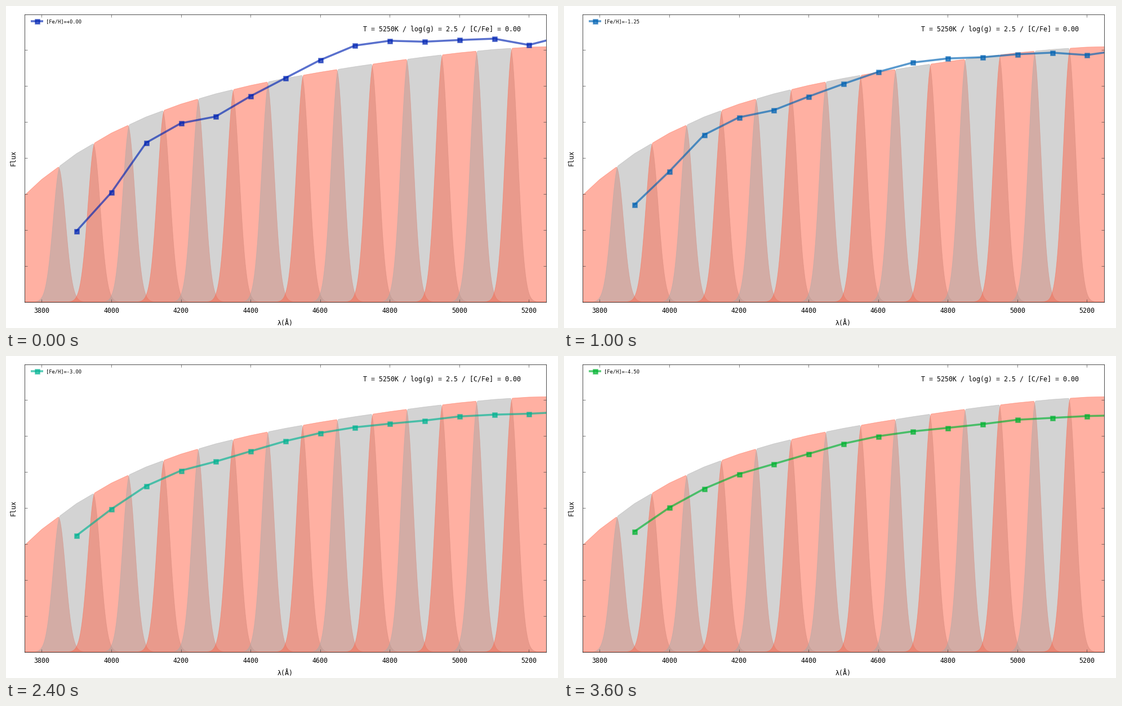
These frames come from a looping animation (980x572 px, 3800 ms). A matplotlib script:

```python
import numpy as np
import matplotlib.pyplot as plt
from matplotlib.animation import FuncAnimation
from matplotlib.colors import hsv_to_rgb

W, H, DPI = 980, 572, 64
PX = 72 / DPI                      # points per pixel
LEFT, RIGHT, TOP, BOTTOM = 32.5, 959.2, 14.5, 525.7
FRAMES, STEP = 19, 200
FONT = "DejaVu Sans Mono"


def bump(u, center, width):
    return np.exp(-0.5 * ((u - center) / width) ** 2)


def ramp(u, center, width):
    return 1 / (1 + np.exp((center - u) / width))


# Heights are in pixels; u is the wavelength in units of 100 A from 4500 A.
def continuum(u):
    return np.polyval([-0.00946, 0.10525, -0.8018, 11.63, 397.2], u)


def flux(u, s):
    """Stellar flux; s falls from 1 (metal rich) to 0 (metal poor)."""
    poor = (np.polyval([-0.00849, 0.125, -1.1736, 12.29, 368], u)
            + 4 * bump(u, 1.2, 1.1) - 4.5 * bump(u, -1.6, 0.7) + 2 * bump(u, 5, 0.5))
    redward = 52 * ramp(u, 0, 1) + 19 * bump(u, 2.4, 1.1)
    blocked = 90 * ramp(-u, 4.74, 0.32) + 10.7 * bump(u, -2, 0.4) + 14.5 * bump(u, 7, 0.3)
    rebound = 14 * bump(u, -3.3, 2) * 1.3 * s * (1 - s**6)
    return poor + s**2 * (redward - blocked) + rebound


def band(wave, center):
    """Flat-topped filter with Gaussian wings; the outer bands stay open."""
    d = wave - center
    if center == 3800:
        d = np.maximum(d, 0)
    if center == 5200:
        d = np.minimum(d, 0)
    return bump(np.maximum(np.abs(d) - 47, 0), 0, 20.5)


def to_u(wave):
    return (wave - 4500) / 100


fig = plt.figure(figsize=(W / DPI, H / DPI), dpi=DPI, facecolor="white")
ax = fig.add_axes([LEFT / W, 1 - BOTTOM / H, (RIGHT - LEFT) / W, (BOTTOM - TOP) / H])
ax.set(xlim=(3750, 5250), ylim=(0, BOTTOM - TOP))
ax.set_xticks(range(3800, 5201, 200))
ax.set_yticks(np.linspace(0, BOTTOM - TOP, 9)[1:-1])
ax.tick_params(direction="in", top=True, right=True, length=5 * PX, width=0.6 * PX,
               color="#333333", labelbottom=False, labelleft=False)
for spine in ax.spines.values():
    spine.set(linewidth=0.8 * PX, color="#222222")

# The continuum is sampled every 100 A, the filters finely
coarse = np.arange(3700, 5301, 100)
wave = np.linspace(3700, 5300, 1601)
top = np.interp(wave, coarse, continuum(to_u(coarse)))
for n, center in enumerate(range(3800, 5201, 100)):
    ax.fill_between(wave, top * band(wave, center), alpha=0.5, linewidth=0.8 * PX,
                    color="darkgray" if n % 2 else "tomato")

stage = fig.add_axes([0, 0, 1, 1])
stage.set(xlim=(0, W), ylim=(H, 0))
stage.axis("off")


def label(x, y, text, size=11.6, ha="center", **kw):
    return stage.text(x, y, text, family=FONT, fontsize=size * PX, ha=ha,
                      va="baseline", color="black", **kw)


for tick in range(3800, 5201, 200):
    label(LEFT + (tick - 3750) / 1500 * (RIGHT - LEFT), 545, str(tick))
label(496, 566.5, "λ(Å)")
label(16.5, 270, "Flux", rotation=90, rotation_mode="anchor")
label(634, 45, "T = 5250K / log(g) = 2.5 / [C/Fe] = 0.00", ha="left")
legend = label(71, 30, "", size=8.75, ha="left")

style = dict(marker="s", lw=3.5 * PX, ms=7 * PX, mew=2.6 * PX, alpha=0.65, snap=False)
points = np.arange(3900, 5301, 100)
line, = ax.plot(points, flux(to_u(points), 1), zorder=3, **style)
key, = stage.plot([44, 55, 66], [27, 27, 27], markevery=[1], solid_capstyle="butt", **style)


def update(i):
    s = 1 - i / (FRAMES - 1)
    hue = 136 + 92 * s + 33 * s**2 * (1 - s)
    color = hsv_to_rgb((hue / 360, 1, 0.7))
    line.set_ydata(flux(to_u(points), s))
    for item in (line, key):
        item.set_color(color)
        item.set_markerfacecolor(color)
        item.set_markeredgecolor(color)
    legend.set_text(f"[Fe/H]={-i / 4:+.2f}")
    return line, key, legend


anim = FuncAnimation(fig, update, frames=FRAMES, interval=STEP, repeat=True,
                     repeat_delay=0, init_func=lambda: update(0))
plt.show()
```
